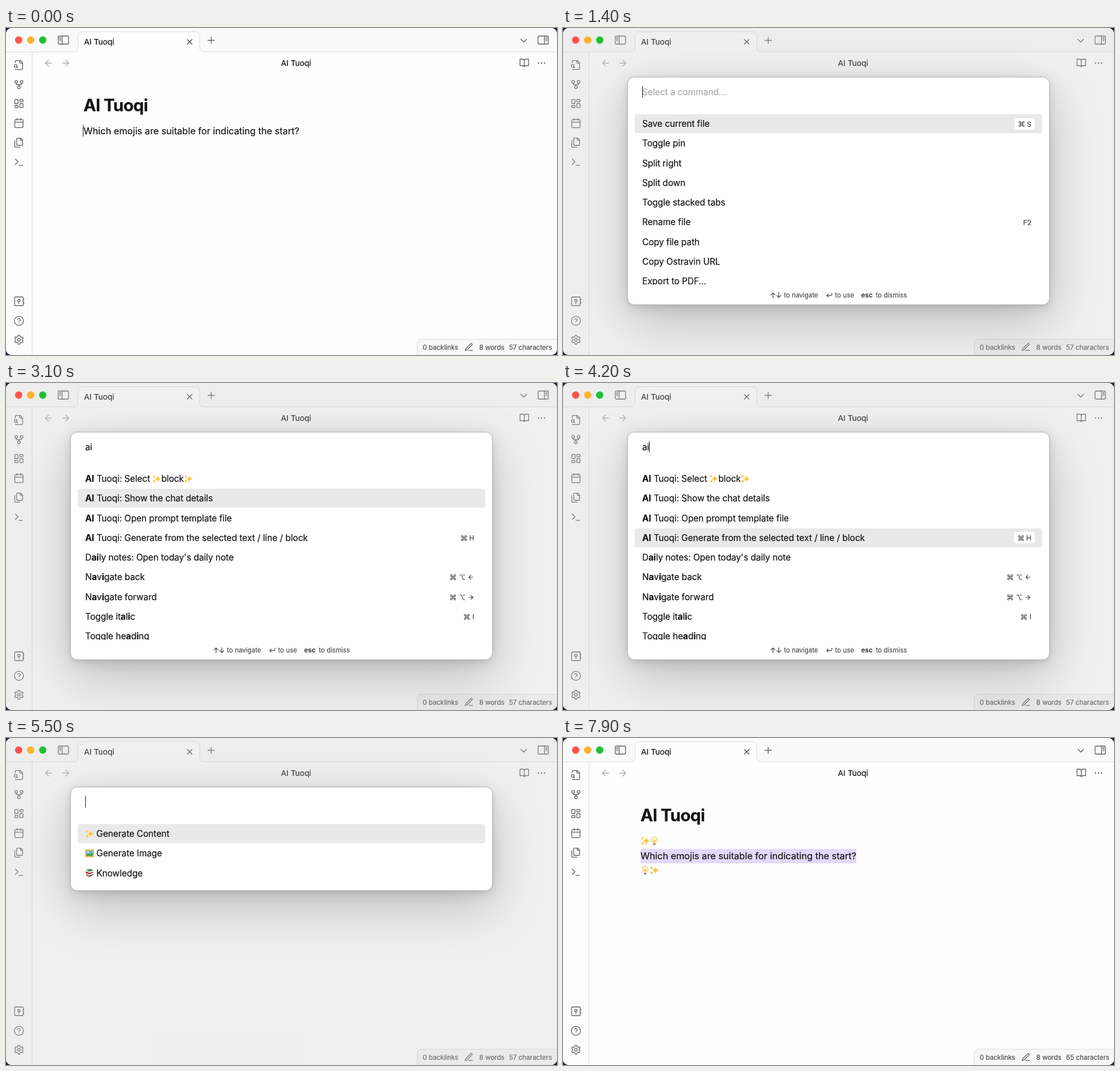
These frames come from a looping animation (960x569 px, 8000 ms). An HTML page:

```html
<!DOCTYPE html>
<html lang="en">
<head>
<meta charset="utf-8">
<title>Command palette</title>
<style>
  html, body { margin: 0; width: 100%; height: 100%; overflow: hidden; background: #1c2438; }
  #win { position: relative; width: 960px; height: 569px; border-radius: 10px; overflow: hidden; background: #fefefe;
    font-family: Inter, "Liberation Sans", sans-serif; font-optical-sizing: none; letter-spacing: -.003em;
    color: #141414; -webkit-text-stroke: .2px; }
  #win div, #win > svg { position: absolute; white-space: pre; }
  svg { overflow: visible; }
  .line { fill: none; stroke: currentColor; stroke-linecap: round; stroke-linejoin: round; }
  .t { height: 20px; line-height: 20px; }
  .h1 { font-weight: 700; letter-spacing: -.025em; }
  .layer { inset: 0; }
  .caret { width: 1px; height: 20px; background: #111; }
  .emoji { width: 1em; height: 1em; vertical-align: -.13em; }
  #dim { inset: 0; background: rgba(200, 200, 200, .27); }
  #panel { left: 112px; top: 84.5px; width: 736px; box-sizing: border-box; background: #fff; border: 1px solid #b4b4b4; border-radius: 12px;
    box-shadow: 0 1.8px 7.3px rgba(0,0,0,.071), 0 6.3px 24.7px rgba(0,0,0,.112), 0 30px 90px rgba(0,0,0,.2); }
  .list { left: 125px; top: 150px; width: 710px; height: 297px; overflow: hidden; font-size: 15.3px; }
  .row { left: 0; width: 697px; height: 33px; line-height: 34px; padding-left: 13px; border-radius: 4px; }
  .row.on { background: #e9e9e9; }
  .row b { font-weight: 650; }
  .key { right: 13px; top: 6.5px; height: 20px; line-height: 21px; padding: 0 6px; border-radius: 4px; font-size: 12px; color: #444; }
  .on .key { background: #fff; }
  .key svg { width: 12px; height: 12px; vertical-align: -1.5px; }
  mark { background: #e2d9fb; color: inherit; display: inline-block; height: 25.2px; }
  .body { left: 135px; font-size: 16.25px; line-height: 25.2px; }
</style>
</head>
<body>
<div id="win"></div>
<script>
const win = document.getElementById('win');
const APP = 'AI Tuoqi';
const QUESTION = 'Which emojis are suitable for indicating the start?';

const circle = (x, y, r) => `<circle cx="${x}" cy="${y}" r="${r}"/>`;
const rect = (x, y, w, h, rx = 1) => `<rect x="${x}" y="${y}" width="${w}" height="${h}" rx="${rx}"/>`;
const path = d => `<path d="${d}"/>`;
const tint = (fill, shapes) => `<g fill="${fill}">${shapes}</g>`;

function gear() {
  let d = '';
  for (let i = 0; i < 96; i++) {
    const a = i / 96 * Math.PI * 2;
    const r = 8.5 + 1.5 * Math.tanh(2.2 * Math.cos(6 * a));
    d += (i ? 'L' : 'M') + (12 + r * Math.sin(a)).toFixed(2) + ' ' + (12 - r * Math.cos(a)).toFixed(2);
  }
  return path(d + 'Z') + circle(12, 12, 3);
}

// Line icons on a 24-unit grid
const ICONS = {
  side: rect(3, 5, 18, 14, 2) + path('M9.8 5v14M5.2 8h2.3M5.2 10.4h2.3M5.2 12.8h2.3'),
  search: path('M14 2v4a2 2 0 0 0 2 2h4M4.3 21a2 2 0 0 0 1.7 1h12a2 2 0 0 0 2-2V7l-5-5H6a2 2 0 0 0-2 2v3M9 18l-1.5-1.5') + circle(5, 14, 3),
  fork: circle(12, 18, 3) + circle(6, 6, 3) + circle(18, 6, 3) + path('M18 9v2c0 .6-.4 1-1 1H7c-.6 0-1-.4-1-1V9M12 12v3'),
  board: rect(3, 3, 7, 9) + rect(14, 3, 7, 5) + rect(14, 12, 7, 9) + rect(3, 16, 7, 5),
  calendar: rect(3, 4, 18, 18, 2) + path('M16 2v4M8 2v4M3 10h18'),
  files: path('M20 7h-3a2 2 0 0 1-2-2V2M9 18a2 2 0 0 1-2-2V4a2 2 0 0 1 2-2h7l4 4v10a2 2 0 0 1-2 2ZM3 7.6v12.8A1.6 1.6 0 0 0 4.6 22h9.8'),
  terminal: path('M4 17l6-6-6-6M12 19h8'),
  vault: rect(2.5, 2.5, 19, 19, 2) + circle(12, 10.5, 2.6) + path('M12 13.2v3.6M22.6 7v2.5M22.6 14.5V17'),
  help: circle(12, 12, 10) + path('M9.1 9a3 3 0 0 1 5.8 1c0 2-3 3-3 3M12 17h.01'),
  gear: gear(),
  book: path('M2 3h6a4 4 0 0 1 4 4v14a3 3 0 0 0-3-3H2zM22 3h-6a4 4 0 0 0-4 4v14a3 3 0 0 1 3-3h7z'),
  more: path('M5 12h.01M12 12h.01M19 12h.01'),
  chevron: path('M6 9l6 6 6-6'),
  plus: path('M4 12h16M12 4v16'),
  close: path('M5 5l14 14M19 5L5 19'),
  pen: path('M12 20h9M16.5 3.5a2.1 2.1 0 0 1 3 3L7 19l-4 1 1-4Z'),
  left: path('M12 19l-7-7 7-7M19 12H5'),
  right: path('M12 5l7 7-7 7M5 12h14'),
  up: path('M5 11l7-7 7 7M12 4v17'),
  down: path('M5 13l7 7 7-7M12 20V3'),
  enter: path('M8 8l-5 5 5 5M21 5v5a3 3 0 0 1-3 3H3'),
  cmd: path('M15 6v12a3 3 0 1 0 3-3H6a3 3 0 1 0 3 3V6a3 3 0 1 0-3 3h12a3 3 0 1 0-3-3'),
  opt: path('M3 4h6l6 16h6M14 4h7')
};

const star = (x, y, r) => {
  const k = r * .16;
  return path(`M${x} ${y - r}Q${x + k} ${y - k} ${x + r} ${y}Q${x + k} ${y + k} ${x} ${y + r}Q${x - k} ${y + k} ${x - r} ${y}Q${x - k} ${y - k} ${x} ${y - r}`);
};
const EMOJI = {
  '✨': tint('#f8c63f', star(15, 12, 9) + star(5, 5.5, 4.5) + star(5.5, 18.5, 5)),
  '💡': tint('#e9c86a', circle(12, 9, 8.5)) + tint('#fdf1b8', circle(12, 9, 7.2) + rect(8.6, 14, 6.8, 4)) +
    tint('#e9b84a', path('M9 9h1l1.5 3h1L14 9h1l-2 8h-2z')) + tint('#8d8d8d', rect(8.8, 18, 6.4, 5, 1.5)),
  '🖼': tint('#dca62c', rect(0, 1.5, 24, 21, 1.5)) + tint('#f3d777', rect(2, 3.5, 20, 17)) + tint('#56b8ee', rect(3.5, 5, 17, 14, 0)) +
    tint('#fff', circle(8, 9, 2)) + tint('#3a9a3d', path('M3.5 15q5-3 8-1t9-4v9h-17z')),
  '📚': tint('#3f8f4f', path('M3 3l13-2 6 5-12 3z')) + tint('#eee', path('M4 5l6 4 12-3v3l-12 3-6-4z')) +
    tint('#c8352f', path('M1 9l3-1 6 4 12-3v2l-11 6-9-4z')) + tint('#eee', path('M4 14l7 3 11-5v3l-10 4z')) +
    tint('#5b4036', path('M2 15l9 5 12-5v2l-11 6-9-4z'))
};

const svg = (name, size, weight = 1.3) =>
  `<svg class="line" viewBox="0 0 24 24" width="${size}" height="${size}" stroke-width="${weight * 24 / size}">${ICONS[name]}</svg>`;
const emojify = s => s.replace(/✨|💡|🖼|📚/gu, e => `<svg class="emoji" viewBox="0 0 24 24">${EMOJI[e]}</svg>`);

function add(parent, cls, css, html = '') {
  const el = document.createElement('div');
  el.className = cls;
  el.style.cssText = css;
  el.innerHTML = html;
  parent.append(el);
  return el;
}
const icon = (parent, name, x, y, size = 19, color = '#5f5f5f', weight) =>
  add(parent, '', `left:${x - size / 2}px;top:${y - size / 2}px;width:${size}px;height:${size}px;line-height:0;color:${color}`, svg(name, size, weight));
const text = (parent, x, y, size, html, css = '', cls = '') =>
  add(parent, 't ' + cls, `left:${x}px;top:${y - 10}px;font-size:${size}px;${css}`, html);
const caret = (parent, x, y) => add(parent, 'caret', `left:${x}px;top:${y}px`);

// Window frame
win.innerHTML = `<svg width="960" height="569" fill="none" stroke="#dcdcdc">
  <path d="M0 0H960V41.5H0Z" fill="#fafafa" stroke="none"/>
  <path d="M0 42H45V569H0Z" fill="#fcfcfc" stroke="none"/>
  <path d="M0 41.5H118Q125.5 41.5 125.5 34V14Q125.5 6.5 133 6.5H330Q337.5 6.5 337.5 14V34Q337.5 41.5 345 41.5H960" fill="#fefefe"/>
  <path d="M45.5 42V569"/>
  <path d="M716.5 570V549.5Q716.5 541.5 724.5 541.5H961V570Z" fill="#f7f7f7"/>
</svg>`;

icon(win, 'side', 100, 21, 24);
icon(win, 'side', 936, 21, 24).style.transform = 'scaleX(-1)';
icon(win, 'close', 320, 24, 14, '#444');
icon(win, 'plus', 357, 21.5, 17);
icon(win, 'chevron', 902, 21.5, 20);
icon(win, 'left', 74, 61, 18, '#ababab');
icon(win, 'right', 104, 61, 18, '#ababab');
icon(win, 'book', 903, 61, 18);
icon(win, 'more', 932.5, 61, 18, '#5f5f5f', 2.4);
['search', 'fork', 'board', 'calendar', 'files', 'terminal'].forEach((n, i) => icon(win, n, 22.5, 64.5 + i * 33.7));
['vault', 'help', 'gear'].forEach((n, i) => icon(win, n, 22.5, 475.5 + i * 33.6));
text(win, 136, 23.5, 13.75, APP);
text(win, 479, 61, 13.75, APP);
text(win, 135, 134, 29.5, APP, '', 'h1');

const GRAY = 'color:#505050';
text(win, 726, 555.5, 11.65, '0 backlinks', GRAY);
icon(win, 'pen', 806, 555, 17);
text(win, 824.5, 555.5, 11.65, '8 words', GRAY);
const chars = text(win, 876.5, 555.5, 11.65, '', GRAY);

// Editor
const plain = add(win, 'body', 'top:167.4px', QUESTION);
const block = add(win, 'body', 'top:167.4px', emojify(`✨💡\n<mark>${QUESTION}</mark>\n💡✨`));
const editCaret = caret(win, 134, 169);

// Palette
const modal = add(win, 'layer', '');
add(modal, '', '').id = 'dim';
const panel = add(modal, '', '');
panel.id = 'panel';
const input = text(modal, 138, 111.5, 15.3, '');
const inputCaret = caret(modal, 138, 101);

const found = [
  ['*AI* Tuoqi: Select ✨block✨'],
  ['*AI* Tuoqi: Show the chat details'],
  ['*AI* Tuoqi: Open prompt template file'],
  ['*AI* Tuoqi: Generate from the selected text / line / block', '⌘ H'],
  ["D*ai*ly notes: Open today's daily note"],
  ['N*a*v*i*gate back', '⌘ ⌥ ←'],
  ['N*a*v*i*gate forward', '⌘ ⌥ →'],
  ['Toggle it*a*l*i*c', '⌘ I'],
  ['Toggle he*a*d*i*ng']
];
const VIEWS = {
  all: [['Save current file', '⌘ S'], ['Toggle pin'], ['Split right'], ['Split down'], ['Toggle stacked tabs'],
    ['Rename file', 'F2'], ['Copy file path'], ['Copy Ostravin URL'], ['Export to PDF...']],
  a: found.map(([s, key]) => [s.replace(/\*(a)(i?)\*/gi, '*$1*$2').replace(/\*i\*/g, 'i'), key]),
  ai: found,
  pick: [['✨ Generate Content'], ['🖼 Generate Image'], ['📚 Knowledge']]
};
const KEYS = { '⌘': 'cmd', '⌥': 'opt', '←': 'left', '→': 'right' };

const lists = {};
for (const [view, items] of Object.entries(VIEWS)) {
  const el = lists[view] = add(modal, 'list', '');
  items.forEach(([label, key], i) => {
    const row = add(el, 'row', `top:${i * 34.25}px`, emojify(label.replace(/\*(.+?)\*/g, '<b>$1</b>')));
    if (key) add(row, 'key', '', key.replace(/[⌘⌥←→]/g, k => svg(KEYS[k], 12, 1.1)));
  });
}

const foot = add(modal, 'layer', '');
[['up', 366], ['down', 375.5], ['enter', 464]].forEach(([n, x]) => icon(foot, n, x, 465, 12, '#555'));
[[385, 'to navigate'], [474, 'to use'], [519.5, '<b>esc</b>'], [545, 'to dismiss']].forEach(([x, s]) => text(foot, x, 465, 11.5, s, GRAY));

const lights = [['#ff544d', 22], ['#ffb22b', 43], ['#1fc033', 64]].map(([c, x]) => tint(c, circle(x, 21, 6.4)));
add(win, 'layer', 'pointer-events:none', `<svg width="960" height="569">${lights.join('')}</svg>`);

// Timeline: time, then the values that change
const LOOP = 8000;
const STEPS = [
  [0, { view: 'edit', caret: 1, sel: 0 }],
  [500, { caret: 0 }],
  [1000, { caret: 1 }],
  [1400, { view: 'all' }],
  [1900, { caret: 0 }],
  [2100, { view: 'a', caret: 1 }],
  [2200, { view: 'ai' }],
  [2700, { caret: 0 }],
  [3000, { sel: 1 }],
  [3200, { caret: 1 }],
  [3300, { sel: 2 }],
  [3600, { sel: 3 }],
  [3700, { caret: 0 }],
  [4200, { caret: 1 }],
  [4700, { caret: 0 }],
  [5000, { view: 'edit', caret: 1 }],
  [5300, { view: 'pick', sel: 0 }],
  [5800, { caret: 0 }],
  [6300, { caret: 1 }],
  [6800, { caret: 0 }],
  [7100, { view: 'done' }]
];
const show = (el, on) => { el.style.display = on ? '' : 'none'; };

function draw({ view, caret, sel }) {
  const done = view === 'done';
  const open = view in lists;
  const query = view === 'a' || view === 'ai' ? view : '';
  show(modal, open);
  show(plain, !done);
  show(block, done);
  show(editCaret, caret && !open && !done);
  chars.textContent = (done ? 65 : 57) + ' characters';
  if (!open) return;
  show(foot, view !== 'pick');
  show(inputCaret, caret);
  panel.style.height = (view === 'pick' ? 181 : 397.5) + 'px';
  input.textContent = query || (view === 'all' ? 'Select a command...' : '');
  input.style.color = query ? '' : '#ababab';
  inputCaret.style.left = 138 + (query ? input.offsetWidth : 0) + 'px';
  for (const v in lists) show(lists[v], v === view);
  [...lists[view].children].forEach((row, i) => row.classList.toggle('on', i === sel));
}

const start = performance.now();
let last = -1;
function tick() {
  const t = Math.max(0, performance.now() - start) % LOOP;
  const past = STEPS.filter(([at]) => at <= t);
  if (past.length !== last) {
    last = past.length;
    draw(Object.assign({}, ...past.map(s => s[1])));
  }
  requestAnimationFrame(tick);
}
tick();
</script>
</body>
</html>
```
